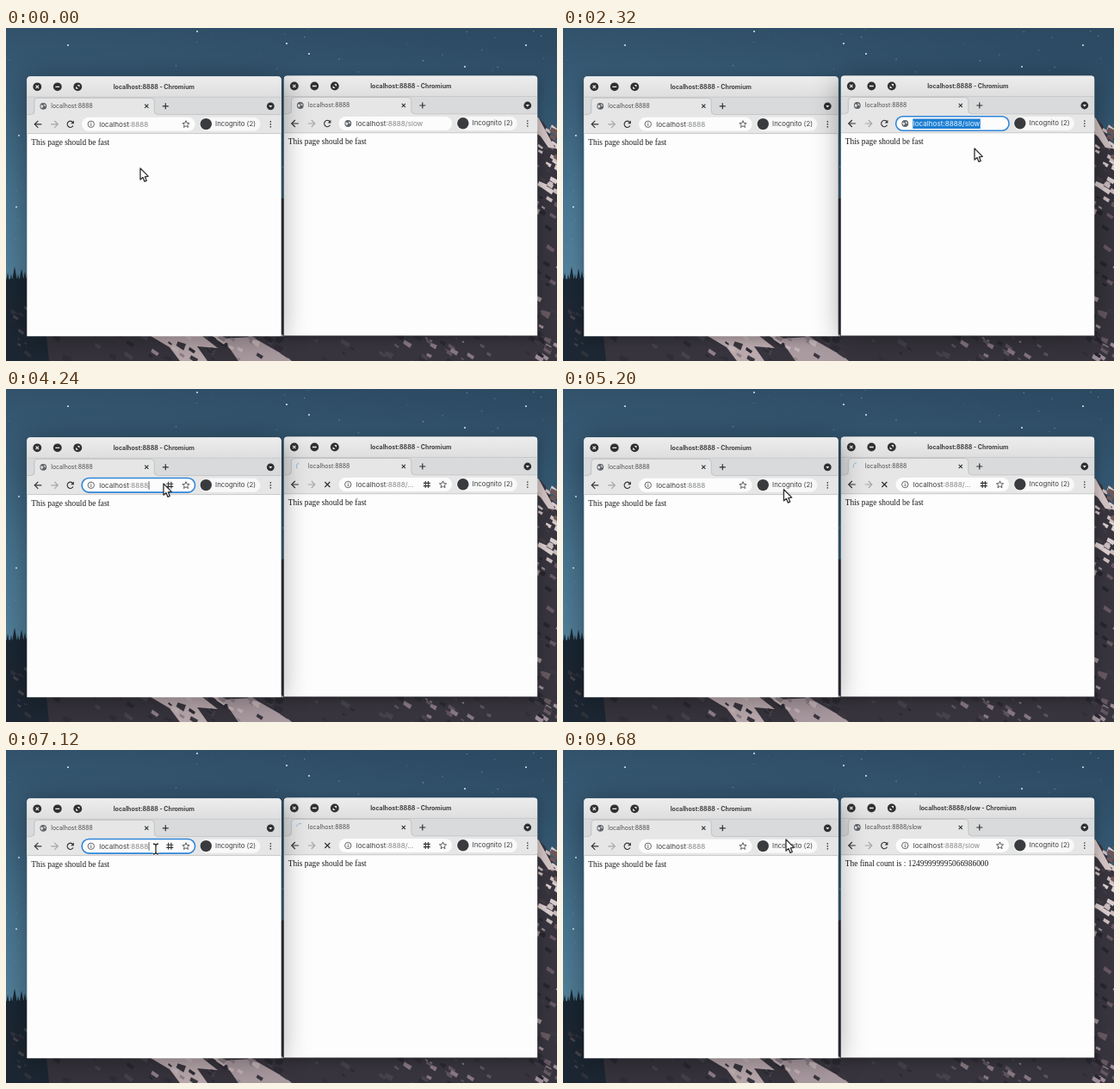
An HTML page with a canvas that plays this animation: 640 px wide and 387 px high, repeating every 9760 ms.

```html
<!DOCTYPE html>
<html lang="en">
<head>
<meta charset="utf-8">
<title>Two browser windows</title>
<style>
html, body { margin: 0; width: 100%; height: 100%; overflow: hidden; background: #35566f; }
canvas { display: block; width: 640px; height: 387px; }
</style>
</head>
<body>
<canvas id="stage" width="640" height="387"></canvas>
<script>
const W = 640, H = 387, LOOP = 9760, STEP = 80;
const DARK = '#333436', GREY = '#85878a', BLUE = '#2f86d8';
const stage = document.getElementById('stage').getContext('2d');
let c = stage;

// time, x, y of the pointer tip
const POINTER = [
  [0, 156, 163], [400, 142, 138], [880, 158, 168], [1440, 257, 116],
  [1840, 440, 111], [2000, 446, 113], [2320, 478, 140], [2640, 480, 146],
  [2960, 452, 196], [3280, 412, 167], [3600, 208, 150], [3840, 174, 113],
  [4240, 183, 110], [4800, 184, 114], [5440, 290, 118], [6080, 375, 122],
  [6320, 384, 148], [6640, 250, 142], [6960, 174, 115], [7360, 174, 115],
  [7760, 195, 142], [8240, 358, 138], [8720, 377, 160], [9280, 272, 112],
  [9520, 259, 104], [9760, 259, 104]
];

function seeded(seed) {
  return () => (seed = (seed * 16807) % 2147483647) / 2147483647;
}

function line(color, width, ...points) {
  c.strokeStyle = color;
  c.lineWidth = width;
  c.beginPath();
  points.forEach(([x, y]) => c.lineTo(x, y));
  c.stroke();
}

function poly(color, points) {
  c.fillStyle = color;
  c.beginPath();
  points.forEach(([x, y]) => c.lineTo(x, y));
  c.closePath();
  c.fill();
}

function disc(x, y, r, color) {
  c.fillStyle = color;
  c.beginPath();
  c.arc(x, y, r, 0, 7);
  c.fill();
}

function arc(x, y, r, from, to, color, width) {
  c.strokeStyle = color;
  c.lineWidth = width;
  c.beginPath();
  c.arc(x, y, r, from, to);
  c.stroke();
}

function box(x, y, w, h, r, color) {
  c.fillStyle = color;
  c.beginPath();
  c.roundRect(x, y, w, h, r);
  c.fill();
}

function text(str, x, y, font, color, align = 'left') {
  c.font = font;
  c.fillStyle = color;
  c.textAlign = align;
  c.fillText(str, x, y);
  return c.measureText(str).width;
}

function cross(x, y, r, color, width) {
  line(color, width, [x - r, y - r], [x + r, y + r]);
  line(color, width, [x - r, y + r], [x + r, y - r]);
}

function gradient(x0, y0, x1, y1, ...colors) {
  const g = c.createLinearGradient(x0, y0, x1, y1);
  colors.forEach((color, i) => g.addColorStop(i / (colors.length - 1), color));
  return g;
}

function makeWallpaper() {
  const canvas = document.createElement('canvas');
  canvas.width = W;
  canvas.height = H;
  c = canvas.getContext('2d');
  const rnd = seeded(77);

  c.fillStyle = gradient(0, 0, 0, 300, '#32526b', '#3b617c', '#487590', '#53809a');
  c.fillRect(0, 0, W, H);
  c.fillStyle = gradient(0, 0, W, 0, 'rgba(20,40,60,0)', 'rgba(20,40,60,.22)');
  c.fillRect(0, 0, W, H);

  for (let i = 0; i < 150; i++) {
    disc(rnd() * W, rnd() * 260, .3 + rnd() * .5, `rgba(220,235,245,${.15 + rnd() * .4})`);
  }
  [[352, 30], [326, 18], [533, 45], [604, 20], [222, 4], [72, 20], [15, 125], [12, 208]]
    .forEach(([x, y]) => disc(x, y, 1, '#dfe9f0'));

  poly('#37343d', [[0, 300], [150, 300], [320, 198], [480, 190], [590, 112], [613, 98],
    [626, 112], [640, 138], [W, H], [0, H]]);

  const slivers = (n, x, y, w, h, size, colors) => {
    for (let i = 0; i < n; i++) {
      const px = x + rnd() * w, py = y + rnd() * h, s = size * (.4 + rnd());
      poly(colors[i % colors.length], [[px, py], [px + s, py + s * (.3 + rnd() * .5)],
        [px + s * .7, py + s * 1.1], [px - s * .2, py + s * .5]]);
    }
  };
  slivers(70, 0, 350, W, 36, 7, ['#2a2931', '#45424b', '#302d36']);
  slivers(18, 440, 356, 120, 28, 6, ['#85767f', '#5c535d']);
  slivers(42, 612, 190, 28, 190, 8, ['#655760', '#26252d', '#9c8d96', '#3c3841']);
  slivers(35, 612, 112, 28, 85, 8, ['#cabbbd', '#6c5758', '#d8cccd', '#423b43']);
  poly('#d0c2c3', [[612, 99], [619, 105], [638, 140], [630, 139], [617, 120]]);
  poly('#b9a9ad', [[168, 358], [228, 358], [246, 372], [222, 370], [234, 387], [202, 387], [190, 371]]);
  poly('#aa9ba1', [[252, 361], [286, 359], [326, 382], [332, 387], [270, 387]]);
  slivers(30, 160, 355, 165, 28, 7, ['#c4b5b8', '#3a363f', '#8f8088', '#2f2c35']);

  // pine trees
  poly('#1c2733', [[0, 292], [40, 290], [50, H], [0, H]]);
  for (let x = -2; x < 30; x += 4) {
    const top = 276 + rnd() * 12;
    poly('#1a2733', [[x, top], [x + 5, top + 28], [x - 5, top + 28]]);
  }
  slivers(14, 0, 320, 24, 64, 6, ['#30343f', '#24272f', '#45434d']);
  c = stage;
  return canvas;
}

function globe(x, y, color = '#5f6367') {
  disc(x, y, 3.9, color);
  poly('#dfe0e1', [[x - 2.6, y - 1.7], [x + .4, y - .4], [x - .5, y + 1], [x - 1.5, y + 2.6], [x - 3, y + .6]]);
  poly('#dfe0e1', [[x + .4, y - 2.8], [x + 2.6, y - 1.3], [x + 2.7, y + .8], [x + 1, y - .8]]);
}

function info(x, y) {
  arc(x, y, 3.7, 0, 7, '#55585c', .9);
  line('#55585c', 1, [x, y - .4], [x, y + 2]);
  disc(x, y - 1.7, .55, '#55585c');
}

function star(x, y) {
  c.strokeStyle = '#4b4d50';
  c.lineWidth = .9;
  c.beginPath();
  for (let i = 0; i < 10; i++) {
    const a = i * Math.PI / 5 - Math.PI / 2, r = i % 2 ? 1.9 : 4.3;
    c.lineTo(x + r * Math.cos(a), y + r * Math.sin(a));
  }
  c.closePath();
  c.stroke();
}

function hashIcon(x, y) {
  for (const d of [-1.6, 1.6]) {
    line(DARK, 1.1, [x - 4, y + d], [x + 4, y + d]);
    line(DARK, 1.1, [x + d, y - 4], [x + d, y + 4]);
  }
}

function arrow(x, y, dir, color) {
  line(color, 1.2, [x - 4 * dir, y], [x + 4 * dir, y]);
  line(color, 1.2, [x, y - 4], [x + 4 * dir, y], [x, y + 4]);
}

function windowButtons() {
  [12, 35.5, 59].forEach(x => disc(x, 12, 4.9, '#2f3032'));
  cross(12, 12, 1.7, '#eee', 1.1);
  line('#eee', 1.3, [33.1, 12], [37.9, 12]);
  poly('#eee', [[61.2, 9.6], [61.2, 12.5], [58.3, 9.6]]);
  poly('#eee', [[56.8, 14.4], [56.8, 11.5], [59.7, 14.4]]);
}

function titleBarAndTabs(w, v, t) {
  c.fillStyle = gradient(0, 0, 0, 24, '#ededed', '#dedede');
  c.fillRect(0, 0, w, 24);
  c.fillStyle = '#d9dadb';
  c.fillRect(0, 24, w, 20);
  line('#c4c5c6', .8, [0, 24], [w, 24]);
  windowButtons();
  text(v.tab + ' - Chromium', 147.5, 12.2, 'bold 7px Inter, sans-serif', '#3d3e40', 'center');

  c.fillStyle = '#e6e6e7';
  c.fillRect(0, 44, w, 22.5);
  box(9, 25, 139, 20, [4, 4, 0, 0], '#e6e6e7');
  c.strokeStyle = '#b9babb';
  c.lineWidth = .8;
  c.beginPath();
  c.moveTo(0, 44.3);
  c.lineTo(5, 44.3);
  c.quadraticCurveTo(8.5, 44, 8.5, 40);
  c.lineTo(8.5, 29);
  c.quadraticCurveTo(8.5, 25, 12.5, 25);
  c.lineTo(144, 25);
  c.quadraticCurveTo(148, 25, 148, 29);
  c.lineTo(148, 40);
  c.quadraticCurveTo(148, 44, 152, 44.3);
  c.lineTo(w, 44.3);
  c.stroke();

  if (v.loading) {
    const a = -t / 1000 * Math.PI * 2 - 2.2;
    arc(19, 34.5, 4.4, a, a + 1.7, '#94bfe2', 1.1);
  } else {
    globe(19, 34.5);
  }
  text(v.tab, 28, 34.7, '6.9px Inter, sans-serif', '#4a4b4d');
  cross(139, 34.5, 2.1, '#333', 1.1);
  line('#333', 1.2, [157.5, 34.5], [164.5, 34.5]);
  line('#333', 1.2, [161, 31], [161, 38]);
  disc(283, 34.5, 4.4, '#2f3032');
  poly('#eee', [[281, 33.6], [285, 33.6], [283, 36.2]]);
}

function toolbar(w, v) {
  line('#bfc0c1', .8, [0, 66.3], [w, 66.3]);
  arrow(13, 55.5, -1, '#333');
  arrow(32, 55.5, 1, '#a5a6a8');
  if (v.loading) {
    cross(50.5, 55.5, 3, '#333', 1.2);
  } else {
    arc(50.5, 55.5, 3.6, .5, 5.5, '#333', 1.2);
    poly('#333', [[54.6, 51.2], [54.6, 55], [50.9, 55]]);
  }

  box(63.8, 47.5, 131.5, 16, 8, '#fcfcfc');
  if (v.focus) {
    c.strokeStyle = BLUE;
    c.lineWidth = 1.6;
    c.beginPath();
    c.roundRect(63.8, 47.2, 131.5, 16.6, 8.3);
    c.stroke();
  }
  (v.globe ? globe : info)(74.5, 55.5);

  const font = '8.1px Inter, sans-serif';
  if (v.selected) {
    box(83.5, 50, 78.5, 11.5, 0, '#1c7fd2');
    text('localhost:8888/slow', 84, 55.8, font, '#e9f4ff');
  } else {
    const hostWidth = text('localhost', 84, 55.8, font, '#3c3d40');
    const restWidth = text(v.rest, 84 + hostWidth, 55.8, font, GREY);
    const end = 84.8 + hostWidth + restWidth;
    if (v.focus) line('#333', .8, [end, 51], [end, 60.5]);
  }
  if (v.hash) hashIcon(166, 55.5);
  if (v.star) star(184.7, 55.7);

  box(200.5, 47.5, 70.5, 16, 8, '#f8f8f8');
  disc(208, 55.3, 6.7, '#3a3b3e');
  text('Incognito (2)', 218.8, 55.6, '7.8px Inter, sans-serif', '#3f4043');
  [-3, 0, 3].forEach(d => disc(283, 55.5 + d, .85, '#3a3b3d'));
}

function browser(v, t) {
  const { x, y, w } = v, h = 302;
  c.save();
  c.translate(x, y);
  c.shadowColor = v.active ? 'rgba(0,0,0,.36)' : 'rgba(0,0,0,.3)';
  c.shadowBlur = v.active ? 32 : 14;
  c.shadowOffsetY = 3;
  box(0, 0, w, h, [4, 4, 0, 0], '#fdfdfd');
  c.shadowColor = 'transparent';
  c.beginPath();
  c.roundRect(0, 0, w, h, [4, 4, 0, 0]);
  c.clip();
  titleBarAndTabs(w, v, t);
  toolbar(w, v);
  text(v.body, 5, 77, '9.35px "Liberation Serif", serif', '#1b1b1b');
  c.restore();
}

function pointerAt(t) {
  const i = POINTER.findIndex((p, n) => n && t <= p[0]);
  const [t0, x0, y0] = POINTER[i - 1], [t1, x1, y1] = POINTER[i];
  const k = (t - t0) / (t1 - t0), e = k * k * (3 - 2 * k);
  return [x0 + (x1 - x0) * e, y0 + (y1 - y0) * e];
}

function drawPointer(x, y) {
  const overField = y > 103 && y < 119 && ((x > 106 && x < 181) || (x > 404 && x < 480));
  c.save();
  c.translate(x, y);
  c.lineJoin = 'round';
  if (overField) {
    for (const [color, width] of [['#fff', 3], ['#2b2b2b', 1.3]]) {
      line(color, width, [0, -5], [0, 5]);
      line(color, width, [-3, -6], [-1, -5.5], [0, -4.5], [1, -5.5], [3, -6]);
      line(color, width, [-3, 6], [-1, 5.5], [0, 4.5], [1, 5.5], [3, 6]);
    }
  } else {
    const shape = [[0, 0], [0, 13.2], [3, 10.6], [5, 15.4], [7.3, 14.4], [5.3, 9.8], [9.3, 9.4]];
    c.shadowColor = 'rgba(0,0,0,.3)';
    c.shadowBlur = 2;
    poly('#fff', shape);
    c.shadowColor = 'transparent';
    line('#343436', 1.3, ...shape, shape[0], shape[1]);
  }
  c.restore();
}

const wallpaper = makeWallpaper();

function draw(t) {
  const within = (a, b) => t >= a && t < b;
  const loading = within(2560, 8720), done = t >= 8720;
  const selected = within(1840, 2560);
  const leftFocus = within(3920, 4640) || within(6960, 7440);
  const rightActive = within(1840, 3920);
  const left = {
    x: 24.3, y: 56.3, w: 295.4, active: !rightActive, tab: 'localhost:8888', rest: ':8888',
    focus: leftFocus, hash: leftFocus, star: true, body: 'This page should be fast'
  };
  const right = {
    x: 322.8, y: 55.5, w: 294.4, active: rightActive, loading, selected, focus: selected,
    tab: done ? 'localhost:8888/slow' : 'localhost:8888',
    rest: loading ? ':8888/...' : ':8888/slow',
    globe: t < 2560, hash: loading, star: loading || done,
    body: done ? 'The final count is : 12499999995066986000' : 'This page should be fast'
  };
  c.textBaseline = 'middle';
  c.drawImage(wallpaper, 0, 0);
  (rightActive ? [left, right] : [right, left]).forEach(v => browser(v, t));
  drawPointer(...pointerAt(t));
}

const start = performance.now();
function tick() {
  const t = (performance.now() - start) % LOOP;
  draw(Math.floor(t / STEP) * STEP);
  requestAnimationFrame(tick);
}
tick();
</script>
</body>
</html>
```
